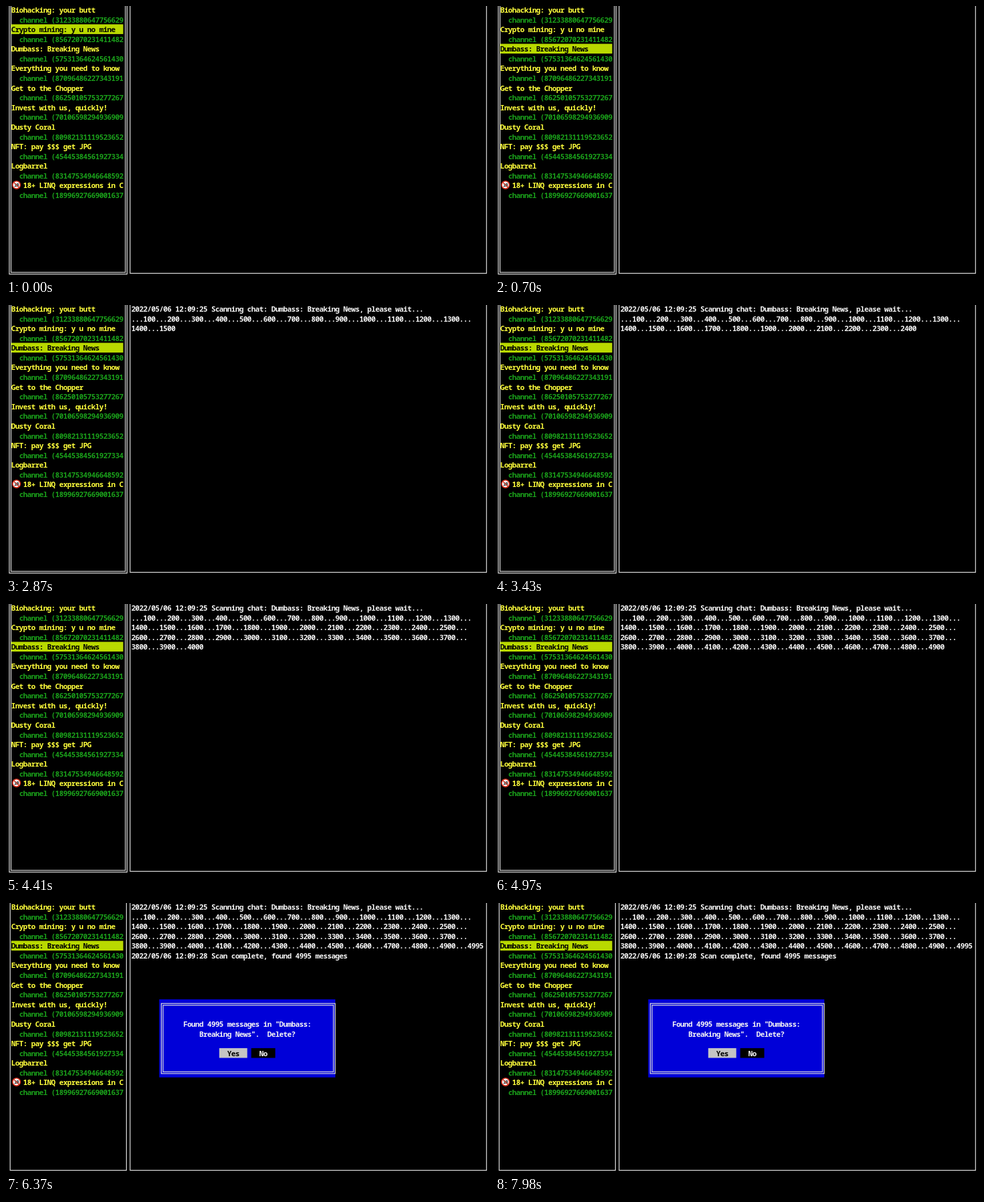
Write an HTML page that moves like this. It is 720x405 px and loops after 8000 ms.

```html
<!DOCTYPE html>
<html lang="en">
<head>
<meta charset="utf-8">
<title>Terminal chat cleaner</title>
<style>
  html, body { margin: 0; width: 100%; height: 100%; overflow: hidden; background: #000; }
  svg { display: block; width: 720px; height: 405px; }
  text { font: 700 11px "Noto Sans Mono", "DejaVu Sans Mono", monospace; white-space: pre; }
  .badge { font: 700 7px "Liberation Sans", sans-serif; letter-spacing: -0.5px; }
</style>
</head>
<body>
<svg id="stage" viewBox="0 0 720 405" xmlns="http://www.w3.org/2000/svg"></svg>
<script>
const LOOP = 8000, STEP = 70;
const MOVE_AT = 560, SCAN_AT = 1960, COUNT_FROM = 1905, PER_HUNDRED = 62, DONE_AT = 5040;
const CELL_W = 5.965, CELL_H = 14.58, LEFT = 7.7, TOP = -1.8;
const LOG_COL = 30, LOG_WIDTH = 88, TOTAL = 4995;
const YELLOW = '#ffff3c', GREEN = '#1a9e1a', LIME = '#b9d900', WHITE = '#f4f4f4', LINE = '#dcdcdc';

const CHATS = [
  ['Biohacking: your butt', '31233880647756629'],
  ['Crypto mining: y u no mine', '85672070231411482'],
  ['Dumbass: Breaking News', '57531364624561430'],
  ['Everything you need to know', '87096486227343191'],
  ['Get to the Chopper', '86250105753277267'],
  ['Invest with us, quickly!', '70106598294936909'],
  ['Dusty Coral', '80982131119523652'],
  ['NFT: pay $$$ get JPG', '45445384561927334'],
  ['Logbarrel', '83147534946648592'],
  ['   18+ LINQ expressions in C', '18996927669001637']
];

const stage = document.getElementById('stage');
const colX = col => LEFT + col * CELL_W;
const rowY = row => TOP + row * CELL_H;

function add(parent, name, attrs = {}) {
  const node = document.createElementNS(stage.namespaceURI, name);
  for (const key in attrs) node.setAttribute(key, attrs[key]);
  return parent.appendChild(node);
}

function cells(parent, col, row, width, height, fill) {
  return add(parent, 'rect', {
    x: colX(col), y: rowY(row), width: width * CELL_W, height: height * CELL_H, fill
  });
}

function write(parent, col, row, content, fill) {
  const node = add(parent, 'text', { x: colX(col), y: rowY(row) + 11.8, fill });
  node.textContent = content;
  return node;
}

function frame(parent, x1, y1, x2, y2) {
  return add(parent, 'rect', {
    x: x1, y: y1, width: x2 - x1, height: y2 - y1, fill: 'none', stroke: LINE, 'stroke-width': 1.2
  });
}

function doubleFrame(parent, x1, y1, x2, y2) {
  const group = add(parent, 'g');
  for (const d of [-1.3, 1.3]) frame(group, x1 + d, y1 + d, x2 - d, y2 - d);
  return group;
}

// Fit the font's advance to the terminal grid through letter spacing.
const probe = write(stage, 0, 0, '0'.repeat(20), WHITE);
const advance = probe.getComputedTextLength() / 20;
probe.remove();
const screen = add(stage, 'g', { style: `letter-spacing:${(CELL_W - advance).toFixed(3)}px` });

const focused = doubleFrame(screen, 6.2, -20, 179.2, 399.4);
const unfocused = frame(screen, 6.2, -20, 179.5, 399.5);
frame(screen, 185, -20, 716.3, 399.5);

const highlight = cells(screen, 0, 0, 28, 1, LIME);
const titles = CHATS.map(([title, id], i) => {
  write(screen, 2, i * 2 + 1, `channel (${id}`, GREEN);
  return write(screen, 0, i * 2, title, YELLOW);
});

const badge = add(screen, 'g', { transform: 'translate(15.6 267.4)' });
add(badge, 'circle', { r: 5.7, fill: '#fff', stroke: '#d8321e', 'stroke-width': 1.6 });
add(badge, 'text', { class: 'badge', x: -0.2, y: 2.6, 'text-anchor': 'middle', fill: '#111' }).textContent = '18';
add(badge, 'path', { d: 'M-4 -4L4 4', stroke: '#d8321e', 'stroke-width': 1.3 });

const logLines = Array.from({ length: 6 }, (_, row) => write(screen, LOG_COL, row, '', WHITE));

const dialog = add(screen, 'g');
cells(dialog, 37, 10, 44, 8, '#0000d8');
doubleFrame(dialog, 232.8, 151.5, 489.4, 253.6);
write(dialog, 43, 12, `Found ${TOTAL} messages in "Dumbass:`, WHITE);
write(dialog, 47, 13, 'Breaking News".  Delete?', WHITE);
cells(dialog, 52, 15, 7, 1, '#c4c4c4');
write(dialog, 54, 15, 'Yes', '#000');
cells(dialog, 60, 15, 6, 1, '#000');
write(dialog, 62, 15, 'No', WHITE);

// Progress counter, wrapped at the pane width after each "...".
function progress(hundreds, done) {
  if (!hundreds) return [];
  const counts = Array.from({ length: hundreds }, (_, i) => (i + 1) * 100);
  if (done) counts.push(TOTAL);
  const lines = ['...'];
  counts.forEach((count, i) => {
    const token = count + (i < counts.length - 1 ? '...' : '');
    const last = lines.length - 1;
    if (lines[last].length + token.length > LOG_WIDTH) lines.push(token);
    else lines[last] += token;
  });
  return lines;
}

function logAt(t) {
  if (t < SCAN_AT) return [];
  const done = t >= DONE_AT;
  const hundreds = Math.min(49, Math.floor((t - COUNT_FROM) / PER_HUNDRED));
  const lines = ['2022/05/06 12:09:25 Scanning chat: Dumbass: Breaking News, please wait...',
    ...progress(hundreds, done)];
  if (done) lines.push(`2022/05/06 12:09:28 Scan complete, found ${TOTAL} messages`);
  return lines;
}

const show = (node, visible) => node.setAttribute('display', visible ? 'inline' : 'none');

function render(time) {
  const t = Math.floor((time % LOOP) / STEP) * STEP;
  const selected = t < MOVE_AT ? 1 : 2;
  const done = t >= DONE_AT;
  highlight.setAttribute('y', rowY(selected * 2));
  titles.forEach((title, i) => title.setAttribute('fill', i === selected ? '#000' : YELLOW));
  const lines = logAt(t);
  logLines.forEach((node, i) => { node.textContent = lines[i] || ''; });
  show(focused, !done);
  show(unfocused, done);
  show(dialog, done);
}

const start = performance.now();
function tick() {
  render(performance.now() - start);
  requestAnimationFrame(tick);
}
tick();
</script>
</body>
</html>
```
